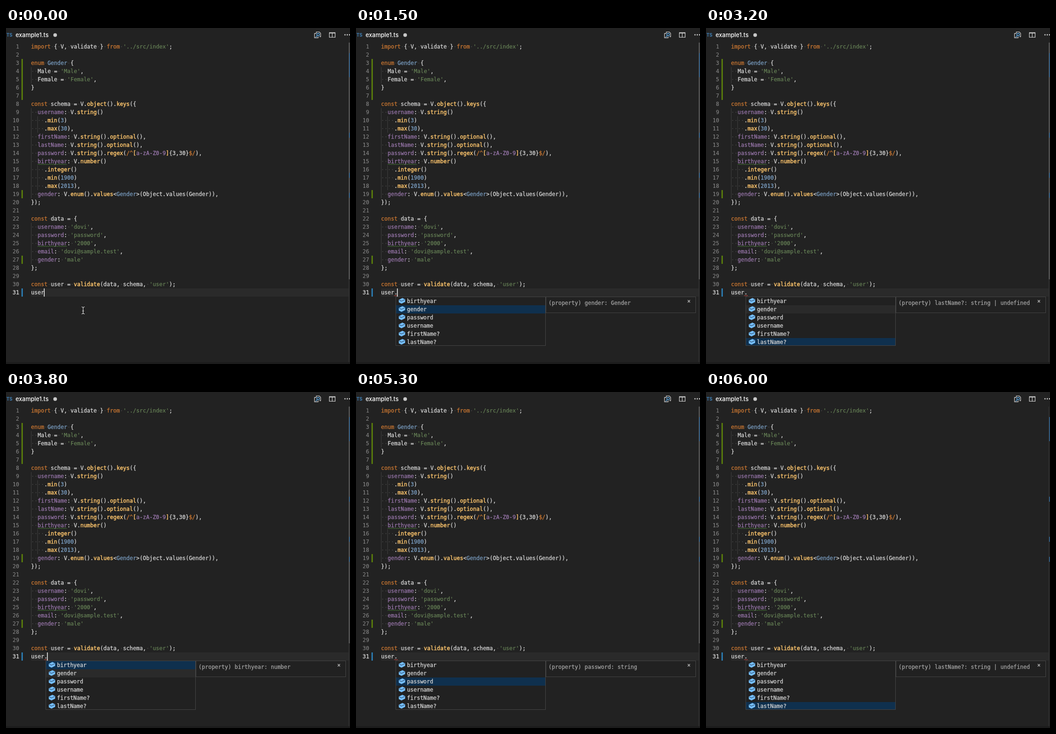
An HTML page for the animation above (6200 ms loop, 756 by 738 pixels).

```html
<!DOCTYPE html>
<html lang="en">
<head>
<meta charset="utf-8">
<title>Editor completion</title>
<style>
html, body { margin: 0; width: 100%; height: 100%; overflow: hidden; background: #222; }
#stage { position: absolute; left: 0; top: 0; width: 756px; height: 738px; overflow: hidden; background: #222;
  font: 12px/18px "DejaVu Sans Mono", "Liberation Mono", monospace; color: #d6d6d6; -webkit-text-stroke: .3px; }
#stage > * { position: absolute; box-sizing: border-box; }
pre { margin: 0; font: inherit; top: 32px; }
#nums { left: 0; width: 29px; text-align: right; color: #858585; -webkit-text-stroke: .1px; }
#nums b { font-weight: 400; color: #d0d0d0; -webkit-text-stroke: .4px; }
#code { left: 55px; }
#line { left: 55px; top: 572px; width: 698px; height: 18px; background: #2a2a2a; }
#code .k { color: #cc7832; }
#code .f { color: #ffc66d; -webkit-text-stroke: .45px; }
#code .s { color: #6a8759; -webkit-text-stroke: .15px; }
#code .p { color: #9876aa; }
#code .n { color: #7a9ec2; }
#code .w { color: #4a4a4a; -webkit-text-stroke: 0; }
svg { left: 0; top: 0; }
#title { left: 21px; top: 6px; font: 500 13px/18px Inter, sans-serif; color: #fff; -webkit-text-stroke: 0; }
#type { left: 1px; top: 6px; font: 700 10px/18px Inter, sans-serif; color: #3f7fb5; -webkit-text-stroke: 0; }
#caret { top: 572px; width: 2px; height: 18px; background: #c8c8c8; }
#list { left: 87px; top: 590px; width: 330px; height: 108px; border: 1px solid #454545; background: #212121; overflow: hidden; }
#list div { height: 18px; padding-left: 24px; position: relative; }
#list svg { position: absolute; left: 5px; top: 1px; }
#info { left: 417px; top: 590px; width: 330px; height: 36px; border: 1px solid #454545; background: #212121;
  padding: 4px 5px; color: #a3a3a3; white-space: pre; }
#close { left: 728px; top: 591px; color: #c0c0c0; }
#slider { left: 753px; top: 32px; width: 3px; height: 520px; background: rgba(121, 121, 121, .45); }
</style>
</head>
<body>
<div id="stage">
  <div id="line"></div>
  <div id="type">TS</div>
  <div id="title">example1.ts</div>
  <pre id="nums"></pre>
  <pre id="code"></pre>
  <svg width="756" height="738" fill="none">
    <circle cx="108" cy="15.5" r="4" fill="#c8c8c8"/>
    <g stroke="#c8c8c8" stroke-width="1.3">
      <path d="M682 12V8.7h6.500l3 3V19H689M682 12h-4v9.500h8V19"/>
      <path d="M710.600 11v9.400h12.800V11M717 11v9.400"/>
      <path d="M710 10.700h14" stroke-width="2.400"/>
    </g>
    <g stroke="#5fa8e0" stroke-width="1.500"><circle cx="686" cy="14.500" r="2.800"/><path d="M684 16.700l-3.500 3.500"/></g>
    <g fill="#d0d0d0"><circle cx="745" cy="15" r="1.400"/><circle cx="750" cy="15" r="1.400"/><circle cx="755" cy="15" r="1.400"/></g>
    <path fill="#587c0c" d="M34 68h3v90h-3zM34 356h3v18h-3zM34 500h3v18h-3z"/>
    <path fill="#2b7bb0" d="M34 572h3v18h-3z"/>
    <path stroke="#404040" d="M55.500 86v36M55.500 176v198M55.500 428v90M69.500 194v36M69.500 302v54"/>
    <path id="warn" stroke="#4f8a3c"/>
    <path id="error" stroke="#d8473f"/>
    <path fill="#383838" d="M753 32h1v702h-1z"/>
    <path fill="#1c1c1c" d="M0 734h756v4H0z"/>
  </svg>
  <div id="slider"></div>
  <svg width="756" height="738" fill="#2d587f"><path d="M754 55h2v53h-2zM754 230h2v11h-2zM754 318h2v11h-2zM754 362h2v11h-2z"/></svg>
  <svg id="mouse" width="756" height="738" fill="none">
    <path id="beam" d="M166 612.500q3.500 0 3.500 2.500q0-2.500 3.500-2.500M169.500 614v12M166 628q3.500 0 3.500-2.500q0 2.500 3.500 2.500M167.500 621.500h4" stroke="#111" stroke-width="3"/>
    <use href="#beam" style="stroke:#fff"/>
    <path d="M166 612.500q3.500 0 3.500 2.500q0-2.500 3.500-2.500M169.500 614v12M166 628q3.500 0 3.500-2.500q0 2.500 3.500 2.500M167.500 621.500h4" stroke="#eee" stroke-width="1.200"/>
  </svg>
  <div id="caret"></div>
  <div id="list"></div>
  <div id="info"></div>
  <div id="close">×</div>
</div>
<script>
const $ = id => document.getElementById(id);
const LOOP = 6200, CHAR = 7.2246;

const source = `import { V, validate } from '../src/index';

enum Gender {
  Male = 'Male',
  Female = 'Female',
}

const schema = V.object().keys({
  username: V.string()
    .min(3)
    .max(30),
  firstName: V.string().optional(),
  lastName: V.string().optional(),
  password: V.string().regex(/^[a-zA-Z0-9]{3,30}$/),
  birthyear: V.number()
    .integer()
    .min(1900)
    .max(2013),
  gender: V.enum().values<Gender>(Object.values(Gender)),
});

const data = {
  username: 'dovi',
  password: 'password',
  birthyear: '2000',
  email: 'dovi@sample.test',
  gender: 'male'
};

const user = validate(data, schema, 'user');
user`;

// Group names double as CSS classes
const rules = [
  "(?<s>'[^']*')",
  "(?<f>(?<=V\\.|\\)\\.|^ +\\.)\\w+|validate(?=\\()|[\\[\\]])",
  "(?<k>\\b(?:import|from|enum|const)\\b|/\\^|\\$/)",
  "(?<p>(?<=^ +)\\w+(?=:)|a-z\\S+9)",
  "(?<n>(?<=enum |&lt;)Gender|(?<=\\()\\d+)",
  "(?<w> +)"
];
const paint = text => text.replace(/</g, '&lt;').replace(/>/g, '&gt;')
  .replace(new RegExp(rules.join('|'), 'gm'), (m, ...rest) => {
    const groups = rest.at(-1);
    const kind = Object.keys(groups).find(k => groups[k]);
    return `<span class="${kind}">${m.replace(/ /g, '·')}</span>`;
  });
$('code').innerHTML = paint(source) + '<span id="dot">.</span>';
$('nums').innerHTML = Array.from({ length: 31 }, (_, i) => i < 30 ? i + 1 : '<b>31</b>').join('\n');

const wave = (x, y, n) => `M${x} ${y}` + 'l2 -2l2 2'.repeat(n);
$('warn').setAttribute('d', wave(69.5, 300.5, 16) + wave(69.5, 480.5, 16));
$('error').setAttribute('d', wave(84, 589, 2));

const fields = [
  ['birthyear', 'number'], ['gender', 'Gender'], ['password', 'string'],
  ['username', 'string'], ['firstName?', 'string | undefined'], ['lastName?', 'string | undefined']
];
const icon = '<svg width="16" height="16"><path fill="#75beff" d="M9 1L1 5v5.500l6 3 8-4V4z"/>' +
  '<path fill="none" stroke="#1d3040" d="M2 5.600L7 8l7-3.400"/></svg>';
$('list').innerHTML = fields.map(([name]) => `<div>${icon}${name}</div>`).join('');
const rows = [...$('list').children];

// [selection time, field, delay of the details]
const moves = [
  [600, 0, 0], [1300, 1, 100], [1900, 2, 100], [2300, 3, 100], [2800, 4, 100], [3200, 5, 0],
  [3800, 0, 0], [4500, 1, 100], [5000, 2, 100], [5400, 3, 100], [5700, 4, 100], [5900, 5, 100]
];
const pick = (t, lagged) => moves.reduce((at, [start, i, lag]) => t >= start + lagged * lag ? i : at, 0);
const show = (id, on) => $(id).style.visibility = on ? 'visible' : 'hidden';

function draw(t) {
  const typed = t >= 500, open = t >= 600;
  show('mouse', !typed);
  show('dot', typed);
  show('error', t >= 900);
  show('caret', typed ? Math.floor(t / 500) % 2 : t < 200);
  $('caret').style.left = (typed ? 90 : 83) + 'px';
  for (const id of ['list', 'info', 'close']) show(id, open);

  const chosen = pick(t, 0);
  rows.forEach((row, i) => row.style.background =
    i === chosen ? '#0f304e' : i === 1 && t < 4900 ? '#2a2a2a' : 'none');
  $('info').textContent = '(property) ' + fields[pick(t, 1)].join(': ');
  $('slider').style.opacity = Math.min(1, Math.max(0, (5800 - t) / 500));
}

const tick = () => {
  draw(performance.now() % LOOP);
  requestAnimationFrame(tick);
};
tick();
</script>
</body>
</html>
```
